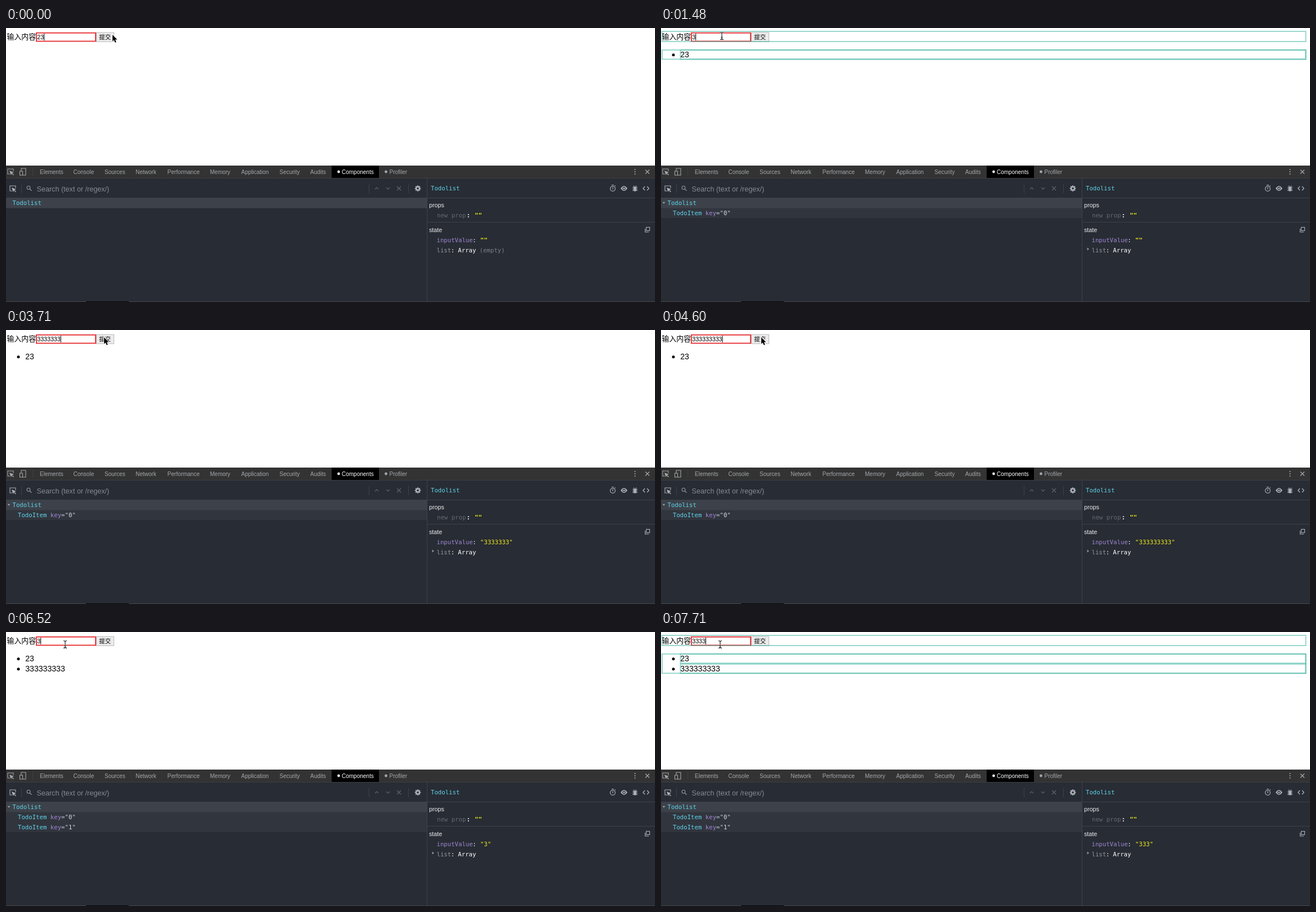
These frames come from a looping animation (1152x486 px, 8 s). An HTML page with a canvas:

```html
<!DOCTYPE html>
<html lang="zh">
<head>
<meta charset="utf-8">
<style>
html, body { margin: 0; width: 100%; height: 100%; overflow: hidden; background: #fff; }
canvas { display: block; width: 1152px; height: 486px; }
</style>
</head>
<body>
<canvas id="stage"></canvas>
<script>
const W = 1152, H = 486, LOOP = 8000;
const canvas = document.getElementById('stage');
const dpr = window.devicePixelRatio || 1;
canvas.width = W * dpr;
canvas.height = H * dpr;
const ctx = canvas.getContext('2d');
ctx.scale(dpr, dpr);

const SANS = '"Liberation Sans", Arial, sans-serif';
const CJK = '"Noto Sans CJK SC", "Noto Sans CJK", sans-serif';
const MONO = '"DejaVu Sans Mono", Menlo, monospace';
const CYAN = '#5fd3ea', PURPLE = '#9d87d2', DIM = '#7a808b', YELLOW = '#f1ee1c';
const ICON = '#abb0b8', LINE = '#3d424a', TEAL = 'rgba(55,175,155,0.5)';

const threes = n => '3'.repeat(n);

// Each step lists only what changes at that time.
const steps = [
  [0, { value: '23', state: '', items: 0, nodes: 0, trace: false, popup: false, caret: true, pointer: 'arrow', x: 189, y: 12 }],
  [140, { trace: true, state: '23', x: 180, y: 13 }],
  [290, { value: '', items: 1, caret: false }],
  [440, { state: '', nodes: 1 }],
  [580, { trace: false }],
  [880, { pointer: 'beam', x: 108, y: 14, caret: true }],
  [1030, { popup: true }],
  [1480, { popup: false, value: '3', trace: true }],
  [1780, { state: '3', trace: false }],
  [1930, { value: threes(2), trace: true }],
  [2080, { value: threes(3), state: threes(2) }],
  [2220, { value: threes(4), state: threes(3) }],
  [2370, { value: threes(5), state: threes(4) }],
  [2520, { state: threes(5), trace: false }],
  [2970, { value: threes(6), trace: true }],
  [3110, { value: threes(7) }],
  [3410, { state: threes(7), pointer: 'arrow', x: 174, y: 13 }],
  [3710, { trace: false }],
  [3860, { value: threes(8), trace: true }],
  [4150, { value: threes(9), x: 178 }],
  [4450, { state: threes(9) }],
  [4600, { trace: false }],
  [4900, { value: '', items: 2, trace: true, caret: false }],
  [5040, { state: '', nodes: 2 }],
  [5340, { trace: false }],
  [5640, { pointer: 'beam', x: 118, y: 18 }],
  [5790, { x: 105, y: 22, caret: true }],
  [5930, { popup: true }],
  [6230, { popup: false, value: '3', trace: true }],
  [6380, { state: '3' }],
  [6520, { trace: false }],
  [6820, { value: threes(2), trace: true }],
  [7120, { trace: false }],
  [7270, { value: threes(3), state: threes(2), trace: true }],
  [7560, { state: threes(3), trace: false }],
  [7710, { value: threes(4), trace: true }]
];

function sceneAt(t) {
  const scene = {};
  for (const [at, change] of steps) if (at <= t) Object.assign(scene, change);
  return scene;
}

function rect(x, y, w, h, color) {
  ctx.fillStyle = color;
  ctx.fillRect(x, y, w, h);
}

function box(x, y, w, h, color, width = 1) {
  ctx.strokeStyle = color;
  ctx.lineWidth = width;
  ctx.strokeRect(x, y, w, h);
}

function text(str, x, y, size, color, font = SANS, weight = '') {
  ctx.font = `${weight} ${size}px ${font}`;
  ctx.fillStyle = color;
  ctx.fillText(str, x, y);
}

const mono = (str, x, y, color, weight) => text(str, x, y, 10.67, color, MONO, weight);

function dot(x, y, r, color) {
  ctx.fillStyle = color;
  ctx.beginPath();
  ctx.arc(x, y, r, 0, Math.PI * 2);
  ctx.fill();
}

function ring(x, y, r, color, width = 1.2) {
  ctx.strokeStyle = color;
  ctx.lineWidth = width;
  ctx.beginPath();
  ctx.arc(x, y, r, 0, Math.PI * 2);
  ctx.stroke();
}

// Path data drawn relative to (x, y).
function icon(x, y, d, color, width = 1.2) {
  ctx.save();
  ctx.translate(x, y);
  const path = new Path2D(d);
  if (width) {
    ctx.strokeStyle = color;
    ctx.lineWidth = width;
    ctx.stroke(path);
  } else {
    ctx.fillStyle = color;
    ctx.fill(path);
  }
  ctx.restore();
}

function inspectIcon(x, y, color) {
  icon(x, y, 'M-1 4H-5V-5H5V-1', color, 1.1);
  icon(x, y, 'M-2 -2L6 1L3 2.2L6 5.2L5 6.2L2 3.2L.8 6Z', color, 0);
}

function drawTabs() {
  rect(0, 244, W, 23, '#333333');
  const gray = '#a4a7ab';
  inspectIcon(8, 255, gray);
  icon(30, 255, 'M-3 -1V-6H5V6H0M-5.500 -1H-.5V6H-5.500Z', gray, 1.1);
  rect(47, 248, 1, 14, '#3f3f3f');
  const tabs = { Elements: 60, Console: 119.5, Sources: 175, Network: 230, Performance: 286.5,
    Memory: 362, Application: 417.5, Security: 485.5, Audits: 540, Profiler: 680.5 };
  for (const name in tabs) text(name, tabs[name], 258.5, 10, gray);
  rect(578, 244, 84, 22, '#000');
  text('Components', 596, 258.5, 10, '#fff');
  dot(590.5, 255, 2.4, '#e4e4e4');
  dot(674.5, 255, 2.4, gray);
  for (const dy of [-4, 0, 4]) dot(1116.5, 255 + dy, 1.1, gray);
  icon(1138.5, 255, 'M-3.500 -3.500L3.500 3.500M3.500 -3.500L-3.500 3.500', gray, 1.3);
}

function drawToolbar() {
  inspectIcon(12, 285, ICON);
  for (const x of [27, 644, 714]) rect(x, 277, 1, 16, LINE);
  ring(40, 283.3, 2.9, '#858b95');
  icon(40, 283.3, 'M2 2L5.500 5.500', '#858b95', 1.4);
  text('Search (text or /regex/)', 54.5, 289.5, 12.6, '#858b94');
  const off = '#5c626d';
  icon(658, 284.500, 'M-3 1.500L0 -1.500L3 1.500', off);
  icon(678, 284.500, 'M-3 -1.500L0 1.500L3 -1.500', off);
  icon(697.500, 284.500, 'M-3.500 -3.500L3.500 3.500M3.500 -3.500L-3.500 3.500', off);

  ring(731, 284.5, 3, ICON, 2.5);
  for (let i = 0; i < 8; i++) {
    const a = i * Math.PI / 4;
    dot(731 + Math.cos(a) * 4.5, 284.5 + Math.sin(a) * 4.5, 1.1, ICON);
  }

  ring(1077, 285, 4.4, ICON);
  icon(1077, 285, 'M0 -2.500V1M-2 -6.500H2M3.500 -4.500L4.800 -5.500', ICON);
  icon(1097, 284.500, 'M-6 0Q0 -8.500 6 0Q0 8.500 -6 0Z', ICON, 0);
  dot(1097, 284.5, 2.7, '#282c34');
  dot(1097, 284.5, 1.6, ICON);
  icon(1116.500, 284.500, 'M-2.500 -3H2.500V4L0 5.500L-2.500 4Z', ICON, 0);
  icon(1116.500, 284.500, 'M-4.500 -2H4.500M-4.500 .8H4.500M-4.500 3.600H4.500M-2.500 -5L-1 -3M2.500 -5L1 -3', ICON, 1.1);
  icon(1136, 284.500, 'M-2 -3.500L-5.200 0L-2 3.500M2 -3.500L5.200 0L2 3.500', ICON, 1.3);
}

function drawTree(s) {
  if (s.nodes) rect(0, 319, 747, 18 * s.nodes, '#31353d');
  rect(0, 301, 747, 18.5, '#3d424a');
  mono('Todolist', 11.5, 313.5, CYAN);
  if (s.nodes) icon(5, 310, 'M-2.500 -1.200H2.500L0 1.700Z', '#9da2aa', 0);
  for (let i = 0; i < s.nodes; i++) {
    const y = 331.5 + 18 * i;
    mono('TodoItem', 21, y, CYAN);
    mono('key', 78.8, y, PURPLE);
    mono('="', 98, y, '#b9c6cf');
    mono(i, 110.9, y, '#d5dde2');
    mono('"', 117.3, y, '#b9c6cf');
  }
}

function drawDetails(s) {
  mono('Todolist', 754, 287.5, CYAN);
  text('props', 751, 317.5, 10.7, '#eceef0');
  mono('new prop', 765, 335.5, '#646a75');
  mono(':', 817.5, 335.5, '#fff', 'bold');
  mono('""', 832, 335.5, YELLOW, 'bold');
  rect(748, 344, W - 748, 1, LINE);

  text('state', 751, 361.5, 10.7, '#eceef0');
  box(1136.5, 353.5, 6, 6, ICON, 1.1);
  icon(1139, 357, 'M-4.500 -1V5H2', ICON, 1.1);
  mono('inputValue', 764.5, 380, PURPLE);
  mono(':', 828.2, 380, '#fff');
  mono(`"${s.state}"`, 841.8, 380, YELLOW, s.state ? '' : 'bold');
  mono('list', 764.5, 397.5, '#9096a0');
  mono(':', 789.8, 397.5, '#fff');
  mono('Array', 802.3, 397.5, '#fff');
  if (s.nodes) icon(758, 392, 'M-1.500 -2.500L2 0L-1.500 2.500Z', '#8f959e', 0);
  else mono('(empty)', 840.5, 397.5, DIM);
}

function drawPanel(s) {
  rect(0, 244, W, H - 244, '#282c34');
  drawTabs();
  rect(0, 266, W, 1, '#3c3f44');
  drawToolbar();
  drawTree(s);
  rect(0, 301, W, 1, LINE);
  drawDetails(s);
  rect(747, 267, 1, 218, LINE);
  rect(0, 485, W, 1, '#45484d');
  rect(142, 485, 76, 1, '#000');
}

function drawForm(s) {
  text('输入内容', 1.5, 19.8, 12.9, '#000', CJK);
  rect(160, 8, 31.5, 16.5, '#ececec');
  box(160.5, 8, 31, 16.3, '#b9b9b9');
  text('提交', 165.3, 19.9, 10.4, '#000', CJK);
  box(54, 8.7, 105, 14.8, '#e83b3f', 2);
  text(s.value, 55.2, 20, 10.67, '#000');
  if (s.caret) rect(55.3 + ctx.measureText(s.value).width, 10, 1, 12, '#000');
}

function drawList(s) {
  const values = ['23', threes(9)];
  for (let i = 0; i < s.items; i++) {
    dot(22, 47.8 + 18 * i, 2.5, '#000');
    text(values[i], 34.2, 52.3 + 18 * i, 14.1, '#000');
  }
}

function drawTrace(s) {
  box(2, 6, 1142.5, 18, TEAL, 2);
  if (!s.items) return;
  box(2, 39, 1142.5, 17.8 * s.items - 1.4, TEAL, 2);
  for (let i = 0; i < s.items; i++) box(34.5, 39 + 17.8 * i, 1110, 16.4, TEAL, 2);
}

function drawPopup() {
  ctx.save();
  ctx.shadowColor = 'rgba(0,0,0,0.4)';
  ctx.shadowBlur = 4 * dpr;
  ctx.shadowOffsetY = dpr;
  ctx.fillStyle = '#28292b';
  ctx.beginPath();
  ctx.roundRect(54, 25, 156, 42, 3);
  ctx.fill();
  ctx.restore();
  text('1', 63.3, 49.5, 10.3, '#fff');
}

function drawPointer(s) {
  if (s.pointer === 'arrow') {
    const arrow = 'M0 0V11.800L2.700 9.300L4.600 13.800L6.700 12.900L4.800 8.500H8.500Z';
    icon(s.x, s.y, arrow, '#fff', 1.8);
    icon(s.x, s.y, arrow, '#000', 0);
  } else {
    const beam = 'M-3 -6.500Q0 -6.500 0 -4.500V4.500Q0 6.500 -3 6.500M3 -6.500Q0 -6.500 0 -4.500M0 4.500Q0 6.500 3 6.500M-1.500 2.500H1.500';
    icon(s.x, s.y, beam, '#fff', 2.4);
    icon(s.x, s.y, beam, '#111', 1.1);
  }
}

function draw(t) {
  const s = sceneAt(t);
  rect(0, 0, W, H, '#fff');
  drawForm(s);
  drawList(s);
  if (s.trace) drawTrace(s);
  if (s.popup) drawPopup();
  drawPointer(s);
  drawPanel(s);
}

const start = performance.now();
function tick() {
  draw((performance.now() - start) % LOOP);
  requestAnimationFrame(tick);
}
tick();
</script>
</body>
</html>
```
